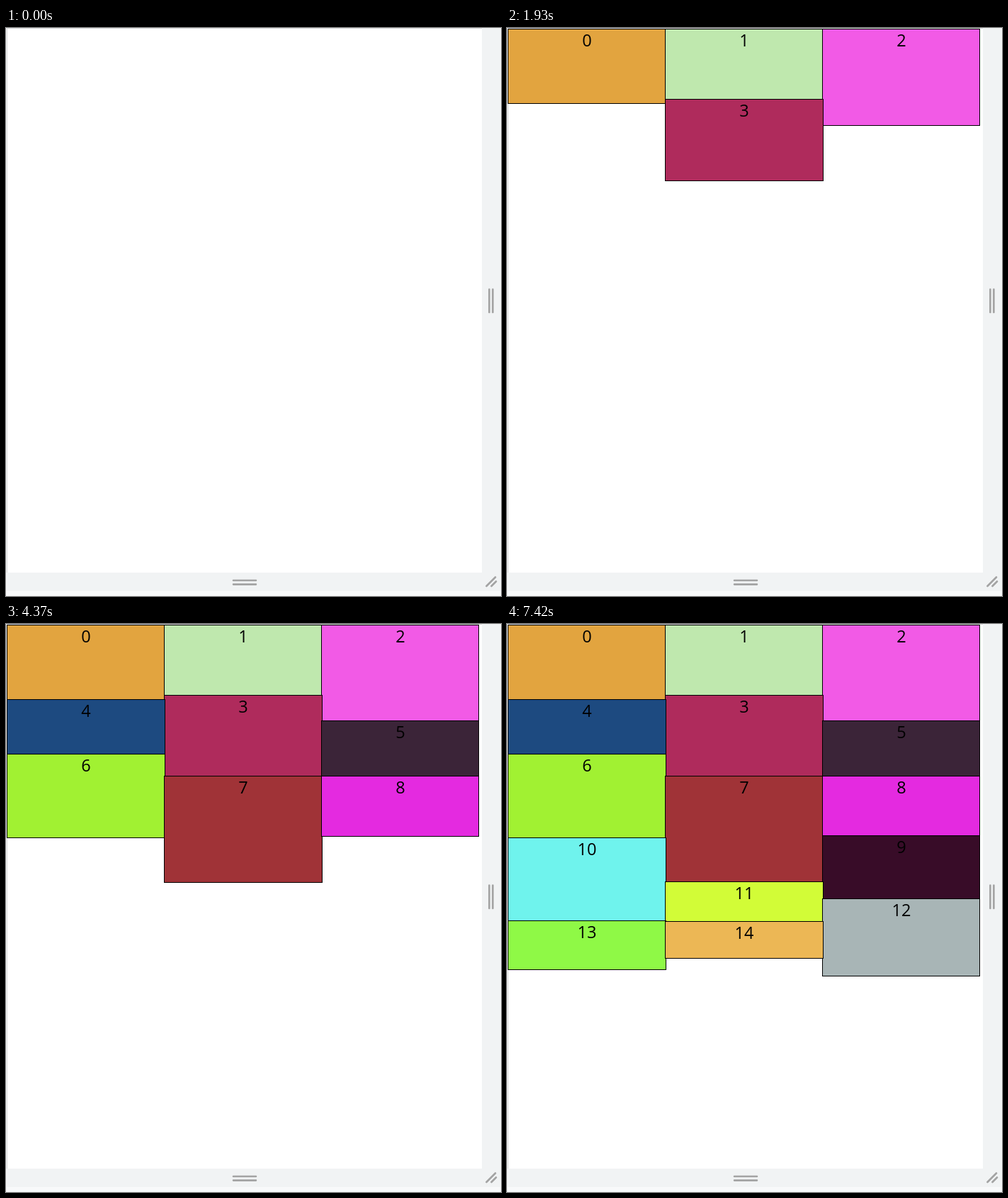
Animation, 699 px wide and 801 px high, one loop 8000 ms. Source, as an HTML page:

```html
<!DOCTYPE html>
<html lang="en">
<head>
<meta charset="utf-8">
<title>Waterfall layout</title>
<style>
  html, body { margin: 0; width: 100%; height: 100%; overflow: hidden; background: #f8f9fa; }
  svg { display: block; }
  text { font: 23.5px "Open Sans", "Noto Sans", sans-serif; text-anchor: middle; }
  .grip { stroke: #a3a3a3; stroke-width: 2.6; stroke-linecap: round; }
</style>
</head>
<body>
<svg width="699" height="801" viewBox="0 0 699 801">
  <path fill="#f1f3f4" d="M672 0h26v794H1v-26h671z"/>
  <path fill="#fff" d="M1 0h671v768H1z"/>
  <path fill="#d8d9da" d="M1 0h671v1H2v767H1z"/>
  <path class="grip" d="M682.4 368.5v32.5M687.4 368.5v32.5M321 779h32M321 784.6h32M678.5 787l12.5-12.5M685.5 787l6.5-6.5"/>
  <g id="cards"></g>
</svg>
<script>
const LOOP = 8000;
const columns = [{ x: 1, w: 224 }, { x: 223, w: 224 }, { x: 445, w: 223 }];

// [appears at ms, column, top, bottom, fill]
const cards = [
  [500, 0, 1, 107, "#e2a43f"],
  [910, 1, 1, 101, "#bfe8ae"],
  [1530, 2, 1, 138, "#f25ae6"],
  [1930, 1, 100, 216, "#af2b5c"],
  [2550, 0, 106, 185, "#1d4a80"],
  [2950, 2, 136, 216, "#3b2438"],
  [3570, 0, 183, 302, "#a1f132"],
  [3970, 1, 214, 365, "#a03337"],
  [4370, 2, 214, 300, "#e42ae0"],
  [4990, 2, 298, 389, "#380c28"],
  [5390, 0, 301, 419, "#6ff3ed"],
  [6000, 1, 363, 421, "#d2fc37"],
  [6400, 2, 387, 497, "#a8b5b6"],
  [7020, 0, 418, 488, "#8ff946"],
  [7420, 1, 419, 472, "#ecb755"]
];

function add(parent, tag, attrs) {
  const el = document.createElementNS("http://www.w3.org/2000/svg", tag);
  for (const key in attrs) el.setAttribute(key, attrs[key]);
  return parent.appendChild(el);
}

const layer = document.getElementById("cards");
const groups = cards.map(([, col, top, bottom, fill], i) => {
  const { x, w } = columns[col];
  const group = add(layer, "g", { visibility: "hidden" });
  add(group, "rect", {
    x: x + 0.5, y: top + 0.5, width: w - 1, height: bottom - top - 1,
    fill, stroke: "#000"
  });
  add(group, "text", { x: x + 112, y: top + 24.5 }).textContent = i;
  return group;
});

function draw() {
  const t = performance.now() % LOOP;
  groups.forEach((group, i) => {
    group.setAttribute("visibility", t >= cards[i][0] ? "visible" : "hidden");
  });
  requestAnimationFrame(draw);
}
draw();
</script>
</body>
</html>
```
